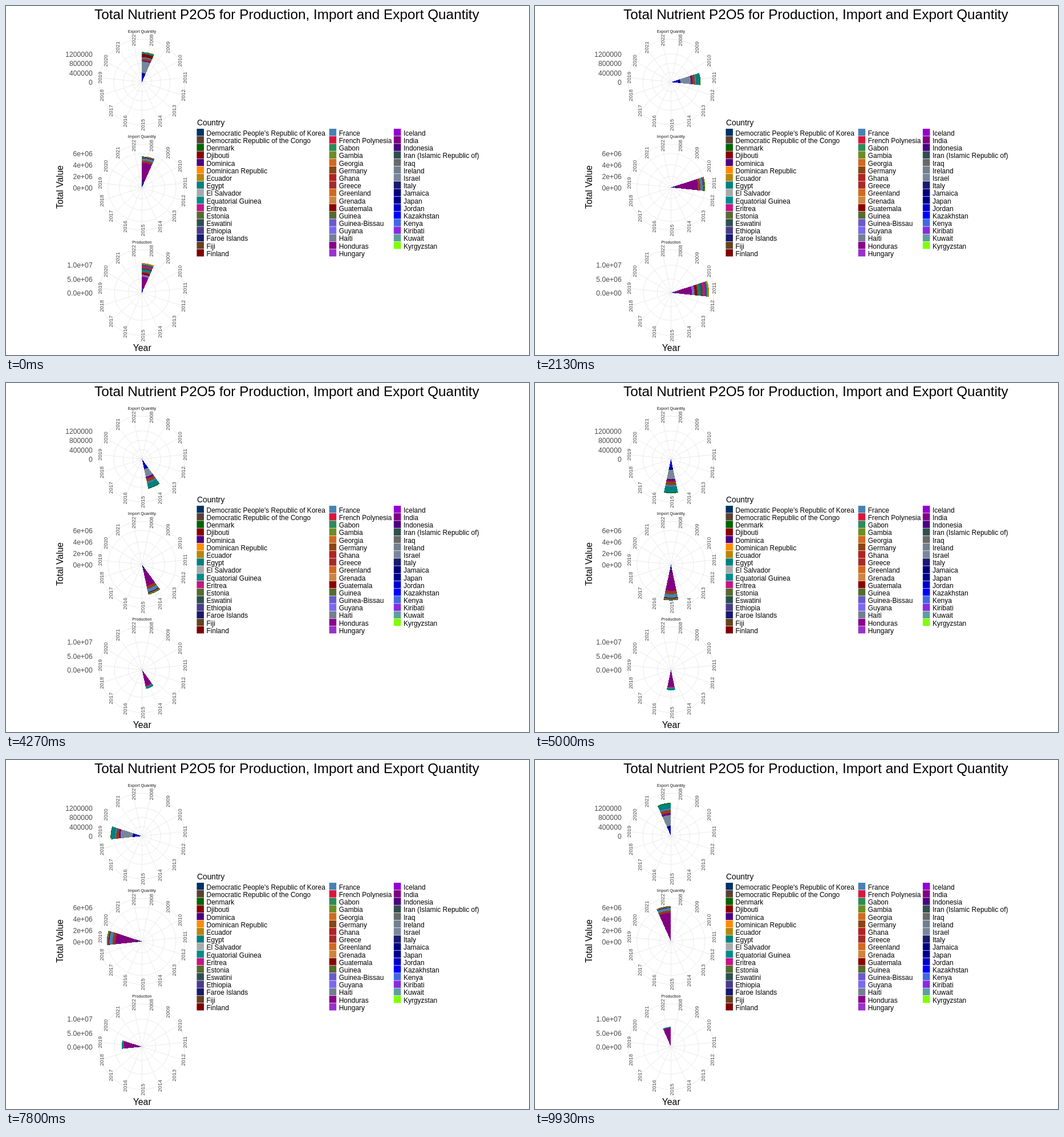
These frames come from a looping animation (917 px wide and 611 px high, 10 s). An HTML page:

```html
<!DOCTYPE html>
<html lang="en">
<head>
<meta charset="utf-8">
<title>Total Nutrient P2O5</title>
<style>
html, body { margin: 0; width: 100%; height: 100%; overflow: hidden; background: #fff; }
svg { display: block; width: 917px; height: 611px; font-family: "Liberation Sans", Arial, sans-serif; }
</style>
</head>
<body>
<svg id="chart" viewBox="0 0 917 611"></svg>
<script>
const LEGEND = [
  `Democratic People's Republic of Korea #003366|Democratic Republic of the Congo #5c4033|Denmark #006400
  |Djibouti #8b0000|Dominica #4b0082|Dominican Republic #ff8c00|Ecuador #b8860b|Egypt #008080
  |El Salvador #a9a9a9|Equatorial Guinea #008b8b|Eritrea #c71585|Estonia #556b2f|Eswatini #2f4f4f
  |Ethiopia #483d8b|Faroe Islands #191970|Fiji #654321|Finland #800000`,
  `France #4682b4|French Polynesia #dc143c|Gabon #2e8b57|Gambia #6b8e23|Georgia #d2691e|Germany #8b4513
  |Ghana #b22222|Greece #a52a2a|Greenland #d2691e|Grenada #cd853f|Guatemala #8b0000|Guinea #556b2f
  |Guinea-Bissau #6a5acd|Guyana #7b68ee|Haiti #708090|Honduras #8b008b|Hungary #9932cc`,
  `Iceland #9400d3|India #800080|Indonesia #4b0082|Iran (Islamic Republic of) #2f4f4f|Iraq #696969
  |Ireland #708090|Israel #778899|Italy #191970|Jamaica #000080|Japan #00008b|Jordan #0000cd
  |Kazakhstan #0000ff|Kenya #4169e1|Kiribati #8a2be2|Kuwait #5f9ea0|Kyrgyzstan #7fff00`
].map(column => column.split('|').map(entry => entry.trim().split(' #')));
const COLORS = Object.fromEntries(LEGEND.flat().map(([name, hex]) => [name, '#' + hex]));

// Radii per year; inner/middle are the outer edges of the first two groups in the key years.
const KEY_YEARS = [0, 2, 4, 6, 9, 11, 14];
const PANELS = [
  {
    title: 'Export Quantity', y: 133.2, ring: 16.5, ticks: ['0', '400000', '800000', '1200000'],
    radii: [53, 37, 50, 52, 42, 47, 53, 60, 53, 50, 52, 55, 60, 66.8, 58],
    inner: [16, 17, 12, 18, 14, 16, 18], middle: [36, 34, 28, 32, 28, 38, 37],
    core: 'Jordan 8 Japan 2', main: 'Israel', split: 1,
    early: 'India 2 Germany 4 France 2 Finland 6 Egypt 3 Ecuador 1',
    late: 'Indonesia 1 India 2 Greece 1 Germany 4 France 2 Egypt 8 Denmark 1'
  },
  {
    title: 'Import Quantity', y: 317.7, ring: 19.9, ticks: ['0e+00', '2e+06', '4e+06', '6e+06'],
    radii: [54.5, 50, 54, 60, 61, 54, 54, 63, 53, 53.5, 62, 61.5, 65.6, 62, 62],
    inner: [14, 11, 10, 13, 10, 10, 5], middle: [43, 43, 47, 38, 42, 46, 50],
    core: 'Kenya 1 Japan 5 Iran 1 Indonesia 4', main: 'India', split: 0,
    early: '',
    late: 'Greece 2 Germany 3 France 5 Finland 1 Ethiopia 1 Ecuador 1 Denmark 1'
  },
  {
    title: 'Production', y: 502, ring: 24.2, ticks: ['0.0e+00', '5.0e+06', '1.0e+07'],
    radii: [52, 52, 64.5, 66.8, 61, 37, 34.5, 36, 38, 36, 36, 36, 36, 36, 35],
    inner: [9, 8, 8, 5, 5, 6, 3], middle: [28, 37, 32, 29, 30, 32, 33],
    core: 'Jordan 3 Japan 4 Israel 2 Indonesia 2', main: 'India', split: 4,
    early: 'Guyana 4 Guinea 1 Guatemala 4 Ghana 2 Gabon 1 Egypt 4 Eswatini 2 Fiji 2 Eritrea 4 Ethiopia 2 Egypt 2 Ecuador 3',
    late: 'Eritrea 1 Gabon 1 Egypt 3'
  }
];
const CX = 238.4, STEP = 24, LOOP = 10000, YEARS = 15, GRID_R = 75;
const svg = document.getElementById('chart');

function add(tag, attrs, content, parent = svg) {
  const node = document.createElementNS('http://www.w3.org/2000/svg', tag);
  for (const key in attrs) node.setAttribute(key, attrs[key]);
  if (content) node.textContent = content;
  return parent.appendChild(node);
}

const label = (content, x, y, size, extra = {}) =>
  add('text', { x, y, 'font-size': size, fill: '#000', ...extra }, content);

function polar(cy, r, degrees) {
  const a = degrees * Math.PI / 180;
  return [CX + r * Math.sin(a), cy - r * Math.cos(a)];
}

function sector(cy, r0, r1, from) {
  const to = from + STEP;
  const at = (r, a) => polar(cy, r, a).map(v => v.toFixed(2)).join(' ');
  return `M${at(r0, from)}L${at(r1, from)}A${r1} ${r1} 0 0 1 ${at(r1, to)}` +
    `L${at(r0, to)}A${r0} ${r0} 0 0 0 ${at(r0, from)}Z`;
}

// Share of the whole radius at a year, interpolated between key years.
function share(panel, edges, year) {
  const i = Math.max(1, KEY_YEARS.findIndex(k => k >= year));
  const [a, b] = [KEY_YEARS[i - 1], KEY_YEARS[i]];
  const [p, q] = [edges[i - 1] / panel.radii[a], edges[i] / panel.radii[b]];
  return p + (q - p) * (year - a) / (b - a);
}

function drawBands(parent, panel, year, spec, from, to) {
  const parts = spec.split(' ');
  const names = parts.filter((_, i) => i % 2 === 0);
  const weights = parts.filter((_, i) => i % 2).map(Number);
  const total = weights.reduce((sum, w) => sum + w, 0);
  let r = from;
  names.forEach((name, i) => {
    const next = r + (to - from) * weights[i] / total;
    const fill = COLORS[name] || COLORS['Iran (Islamic Republic of)'];
    add('path', { d: sector(panel.y, r, next, year * STEP), fill }, '', parent);
    r = next;
  });
}

function drawPanel(panel) {
  const grid = add('g', { fill: 'none', stroke: '#ebebeb', 'stroke-width': 1 });
  const rings = panel.ticks.map((_, i) => i * panel.ring).slice(1);
  for (const r of [...rings, GRID_R]) add('circle', { cx: CX, cy: panel.y, r }, '', grid);
  for (let i = 0; i < YEARS; i++) {
    const [x2, y2] = polar(panel.y, GRID_R, (i + 0.5) * STEP);
    add('line', { x1: CX, y1: panel.y, x2, y2 }, '', grid);
    const x = x2 + 0.9;
    label(2008 + i, x, y2 + 3.4, 9.4, {
      fill: '#4d4d4d', 'text-anchor': 'middle', transform: `rotate(-90 ${x} ${y2})`
    });
  }
  panel.ticks.forEach((tick, i) =>
    label(tick, 151.7, panel.y + 4.8 - i * panel.ring, 12.2, { fill: '#4d4d4d', 'text-anchor': 'end' }));
  label(panel.title, CX, panel.y - 86.3, 7.2, { fill: '#1a1a1a', 'text-anchor': 'middle' });
}

function drawLegend() {
  label('Country', 335, 209, 13.8);
  const columns = [334.5, 566.7, 679.9];
  LEGEND.forEach((column, c) => column.forEach(([name, hex], row) => {
    const y = 214.9 + row * 13.19;
    add('rect', { x: columns[c], y, width: 12.5, height: 12.5, fill: '#' + hex });
    label(name, columns[c] + 17, y + 11.9, 12);
  }));
}

function drawYear(year) {
  const group = add('g', { 'shape-rendering': 'crispEdges' });
  for (const panel of PANELS) {
    const radius = panel.radii[year];
    const inner = radius * share(panel, panel.inner, year);
    const middle = radius * share(panel, panel.middle, year);
    const rest = panel.early && year <= panel.split ? panel.early : panel.late;
    drawBands(group, panel, year, panel.core, 0, inner);
    drawBands(group, panel, year, panel.main + ' 1', inner, middle);
    drawBands(group, panel, year, rest, middle, radius);
  }
  return group;
}

label('Total Nutrient P2O5 for Production, Import and Export Quantity', 155, 23.2, 24.33);
label('Total Value', 0, 0, 15.6, { 'text-anchor': 'middle', transform: 'translate(100 317) rotate(-90)' });
label('Year', 238.7, 604, 15.8, { 'text-anchor': 'middle' });
PANELS.forEach(drawPanel);
drawLegend();

const wedges = Array.from({ length: YEARS }, (_, year) => drawYear(year));
// Switches fall on a grid of 15 ticks per second, rounded to 10 ms.
const starts = wedges.map((_, i) => 10 * Math.round(Math.round(149 * i / 14) * 20 / 3));

function render(time) {
  const year = starts.filter(start => start <= time % LOOP).length - 1;
  wedges.forEach((wedge, i) => wedge.setAttribute('visibility', i === year ? 'visible' : 'hidden'));
}

const origin = performance.now();
function tick() {
  render(performance.now() - origin);
  requestAnimationFrame(tick);
}
tick();
</script>
</body>
</html>
```
